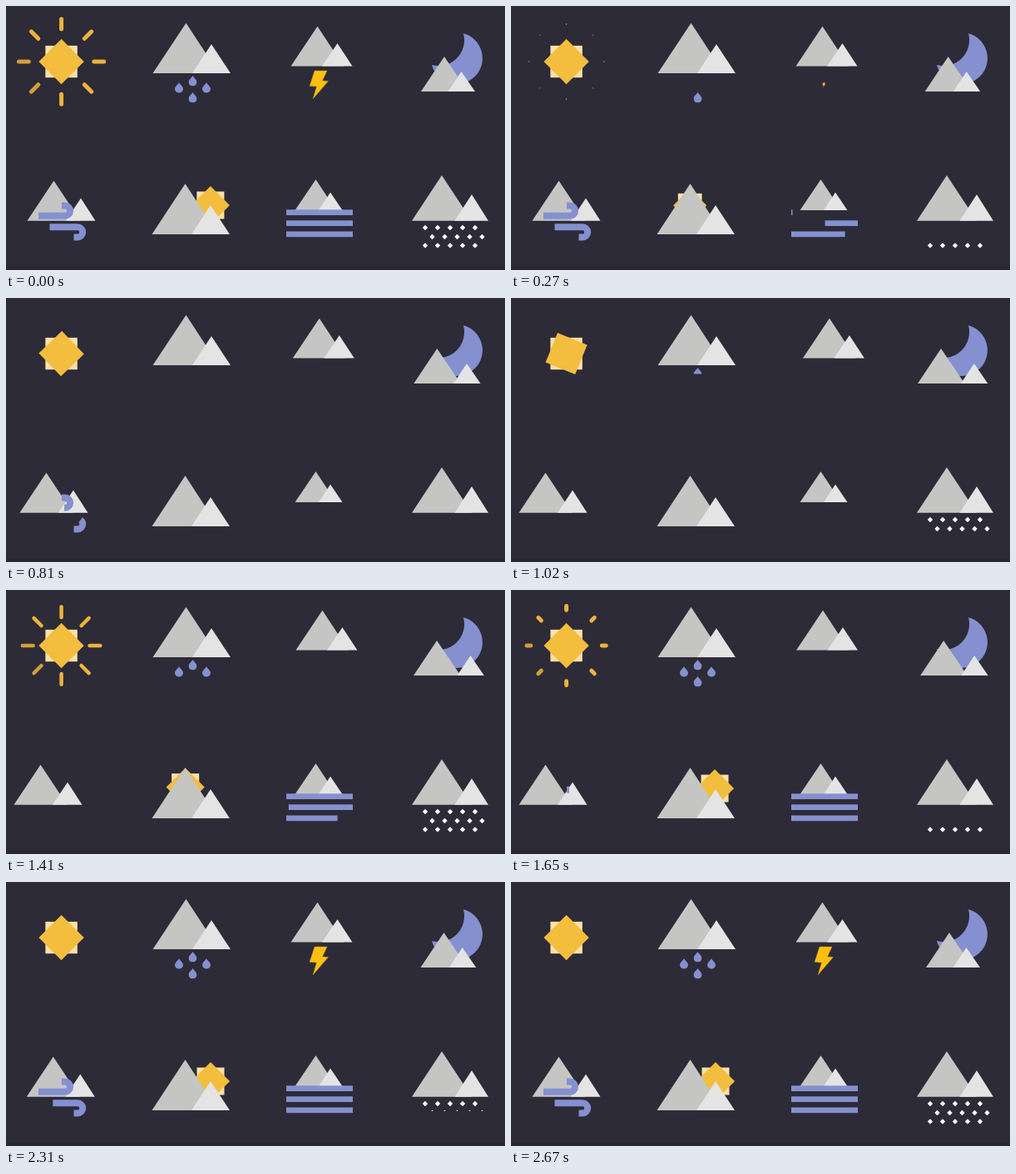
These frames come from a looping animation (600x318 px, 2.7 s). An HTML page without scripts:

```html
<!DOCTYPE html>
<html lang="en">
<head>
<meta charset="utf-8">
<title>Weather icons</title>
<style>
html, body { margin: 0; width: 100%; height: 100%; overflow: hidden; background: #2d2b37; }
svg { display: block; width: 100%; height: 100%; }

.big { fill: #c5c5c3; }
.small { fill: #e4e4e4; }
.blue { fill: #8490d0; }
.pale { fill: #fbe0ab; }
.gold { fill: #f3bd3e; }
.bolt { fill: #fdc011; stroke: #b98d1c; stroke-width: .5; }
.flakes { fill: #fff; }

.move { animation: 2.7s ease-in-out infinite; }

/* Sun */
.spin { rotate: 45deg; animation-name: spin; }
.burst { animation-name: burst; }
.ray {
  fill: none; stroke: #ecb33c; stroke-width: 5; stroke-linecap: round;
  transform: rotate(var(--a)) translate(45.2px);
  animation: ray 2.7s linear infinite;
}
.dim { stroke: #cf9f3b; }
@keyframes spin {
  0%, 28.9% { rotate: 45deg; }
  42.6%, 85.2% { rotate: 135deg; }
  98.9%, 100% { rotate: 225deg; }
}
@keyframes burst {
  0%, 42% { scale: 1; }
  42.01%, 43.7% { scale: 0; }
  54.8%, 100% { scale: 1; }
}
@keyframes ray {
  0% { d: path("M-6 0H6"); stroke-width: 5; }
  4.8% { d: path("M-2.5 0H2.5"); stroke-width: 5; }
  11.1%, 42% { d: path("M0 0H0"); stroke-width: 0; }
  42.01%, 54.8% { d: path("M-7.2 0H7.2"); stroke-width: 5; }
  61.1% { d: path("M-2.5 0H2.5"); stroke-width: 5; }
  67.4%, 100% { d: path("M0 0H0"); stroke-width: 0; }
}

/* Rain and snow are wiped from top to bottom */
.drop { animation: rain 2.7s linear var(--d) infinite; }
.flakes g { animation: snow 1.35s linear var(--d) infinite; }
@keyframes rain {
  0% { clip-path: inset(0 0 0 0); }
  4.4%, 35.5% { clip-path: inset(100% 0 0 0); }
  35.51% { clip-path: inset(0 0 100% 0); }
  39.3%, 100% { clip-path: inset(0 0 0 0); }
}
@keyframes snow {
  0% { clip-path: inset(0 0 0 0); }
  5%, 57% { clip-path: inset(100% 0 0 0); }
  57.01% { clip-path: inset(0 0 100% 0); }
  62%, 100% { clip-path: inset(0 0 0 0); }
}

/* Lightning */
.storm { animation-name: storm; }
.bolt { transform-box: fill-box; transform-origin: center; animation-name: bolt; }
@keyframes storm {
  0%, 23.7% { translate: 0; }
  42.6% { translate: 9.7px; }
  64.8%, 100% { translate: 0; }
}
@keyframes bolt {
  0% { scale: 1; }
  14%, 63% { scale: 0; }
  74.4% { scale: 1.47; }
  83%, 100% { scale: 1; }
}

/* Night */
.left { animation-name: left; }
.right { animation-name: right; }
@keyframes left {
  0% { translate: 0; }
  40% { translate: -10px; }
  94%, 100% { translate: 0; }
}
@keyframes right {
  0%, 5% { translate: 0; }
  50% { translate: 11px; }
  96.5%, 100% { translate: 0; }
}

/* Wind */
.hill { animation-name: hill; }
.wind { fill: none; stroke: #8490d0; stroke-width: 8; stroke-dasharray: 1 2; }
.gust1 { animation: gust1 2.7s linear infinite; }
.gust2 { animation: gust2 2.7s linear infinite; }
@keyframes hill {
  0%, 22.5% { translate: 0; }
  36.5%, 66% { translate: -16px; }
  89%, 100% { translate: 0; }
}
@keyframes gust1 {
  0%, 23.5% { stroke-dashoffset: 0; }
  35%, 60.4% { stroke-dashoffset: 1; }
  74%, 100% { stroke-dashoffset: 0; }
}
@keyframes gust2 {
  0%, 22.5% { stroke-dashoffset: 0; }
  34%, 70.4% { stroke-dashoffset: 1; }
  86.7%, 100% { stroke-dashoffset: 0; }
}

/* Sun behind the mountains */
.rise { animation: rise 2.7s linear infinite; }
.peek { animation-name: peek; }
.peek .ray { transform: rotate(var(--a)) translate(42px); animation-name: glint; }
@keyframes rise {
  0% { translate: 246px 240px; scale: 1; }
  9% { translate: 215.5px 237.5px; scale: 1; }
  17%, 44% { translate: 213px 258px; scale: 0; }
  52.2% { translate: 215.5px 237.5px; scale: 1; }
  61.1% { translate: 245px 239px; scale: 1; }
  63%, 100% { translate: 246px 240px; scale: 1; }
}
@keyframes peek {
  0%, 63% { scale: 0; }
  72%, 100% { scale: 1; }
}
@keyframes glint {
  0%, 72% { d: path("M-5.5 0H5.5"); stroke-width: 5; }
  76% { d: path("M-3 0H3"); stroke-width: 5; }
  82%, 100% { d: path("M0 0H0"); stroke-width: 0; }
}

/* Fog */
.bar { transform-box: fill-box; transform-origin: left; animation-name: bar; animation-delay: var(--d); }
.flip { transform-origin: right; }
@keyframes bar {
  0% { scale: 1 1; }
  11.1%, 38.15% { scale: 0 1; }
  49.3%, 100% { scale: 1 1; }
}
</style>
</head>
<body>
<svg viewBox="0 0 600 318" preserveAspectRatio="none">
  <defs>
    <path id="drop" d="M0-6.5C1-4 5-1.5 5 1.3A5 5 0 0 1-5 1.3C-5-1.5-1-4 0-6.5Z"/>
    <path id="flake" d="M0-3.2 3.2 0 0 3.2-3.2 0Z"/>
    <g id="row">
      <use href="#flake"/><use href="#flake" x="15"/><use href="#flake" x="30"/>
      <use href="#flake" x="45"/><use href="#flake" x="60"/>
    </g>
  </defs>

  <rect y="314" width="600" height="4" fill="#2a2732"/>

  <g transform="translate(66.6 67)">
    <g class="move burst">
      <path class="ray" style="--a:0deg"/>
      <path class="ray" style="--a:45deg"/>
      <path class="ray" style="--a:90deg"/>
      <path class="ray dim" style="--a:135deg"/>
      <path class="ray dim" style="--a:180deg"/>
      <path class="ray" style="--a:225deg"/>
      <path class="ray" style="--a:270deg"/>
      <path class="ray" style="--a:315deg"/>
    </g>
    <rect class="pale" x="-19.2" y="-19.2" width="38.4" height="38.4"/>
    <rect class="gold move spin" x="-19.2" y="-19.2" width="38.4" height="38.4"/>
  </g>

  <path class="big" d="M216.5 20.5 256 81H176.500Z"/>
  <path class="small" d="M247 46 270 81H224Z"/>
  <g class="blue">
    <g class="drop" style="--d:0s"><use href="#drop" x="224.500" y="90.300"/></g>
    <g class="drop" style="--d:-2.55s"><use href="#drop" x="208" y="98.500"/></g>
    <g class="drop" style="--d:-2.55s"><use href="#drop" x="241" y="98.500"/></g>
    <g class="drop" style="--d:-2.25s"><use href="#drop" x="224.500" y="110.300"/></g>
  </g>

  <g class="move storm">
    <path class="big" d="M374.500 24.500 406 72.500H342.500Z"/>
    <path class="small" d="M398.500 45 416.500 72.500H380Z"/>
  </g>
  <path class="bolt move" d="M371 78H386L380.500 90 387.500 90.500 369 112 373.500 97 365 96.500Z"/>

  <path class="blue" d="M550 33A31 31 0 1 1 512 71A31 31 0 0 0 550 33Z"/>
  <path class="big move left" d="M527 61 555.500 103H499Z"/>
  <path class="small move right" d="M547.500 79 564 103H531.500Z"/>

  <g class="move hill">
    <path class="big" d="M57.500 210.500 89.500 258.700H25.500Z"/>
    <path class="small" d="M90 231.500 107.500 258.700H72Z"/>
  </g>
  <path class="wind gust1" pathLength="1" d="M67 240.600H71A6.100 6.100 0 0 1 71 252.800H39"/>
  <path class="wind gust2" pathLength="1" d="M81.500 278.600H86A6.200 6.200 0 0 0 86 266.200H52.500"/>

  <g class="rise">
    <g class="move peek">
      <path class="ray" style="--a:-110deg"/>
      <path class="ray" style="--a:-59.500deg"/>
      <path class="ray" style="--a:-9.700deg"/>
      <path class="ray" style="--a:37deg"/>
    </g>
    <rect class="pale" x="-16.500" y="-16.500" width="33" height="33"/>
    <rect class="gold" x="-16.300" y="-16.300" width="32.600" height="32.600" transform="rotate(45)"/>
  </g>
  <path class="big" d="M215.500 214 255 275H175.500Z"/>
  <path class="small" d="M246 240 269 275H223Z"/>

  <path class="big" d="M372.500 209 397 246H347.500Z"/>
  <path class="small" d="M390 224.500 404.500 246H376Z"/>
  <g class="blue">
    <rect class="move bar" style="--d:0s" x="337" y="245.300" width="80" height="6.700"/>
    <rect class="move bar flip" style="--d:-2.580s" x="337" y="258.300" width="80" height="6.700"/>
    <rect class="move bar" style="--d:-2.520s" x="337" y="271.500" width="80" height="6.700"/>
  </g>

  <path class="big" d="M524 204 560 258.700H488Z"/>
  <path class="small" d="M560 227 580 258.700H539.500Z"/>
  <g class="flakes">
    <g style="--d:-1.250s"><use href="#row" x="504" y="267"/></g>
    <g style="--d:-1.170s"><use href="#row" x="512.500" y="278"/></g>
    <g style="--d:-1.050s"><use href="#row" x="504" y="288.500"/></g>
  </g>
</svg>
</body>
</html>
```
